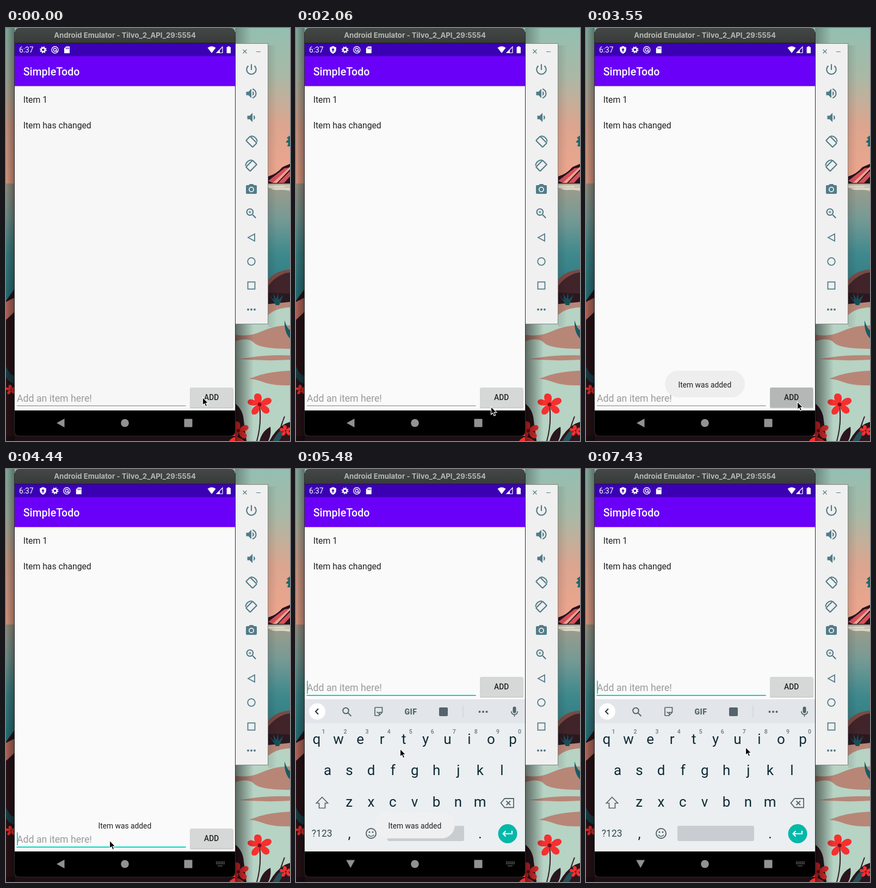
These frames come from a looping animation (522 by 757 pixels, 8000 ms). An HTML page:

```html
<!DOCTYPE html>
<html lang="en">
<head>
<meta charset="utf-8">
<title>Todo list demo</title>
<style>
  html, body { margin: 0; width: 100%; height: 100%; overflow: hidden; background: #2a1319; }
  svg { display: block; width: 522px; height: 757px; }
  text { font-family: Roboto, "Open Sans", sans-serif; fill: #212121; white-space: pre; }
  .mid { text-anchor: middle; }
  .line { fill: none; stroke: currentColor; }
  .side { color: #527c89; fill: #527c89; }
  .keys { color: #55646b; fill: #55646b; }
  .letter { font-size: 26px; fill: #0f2a34; text-anchor: middle; }
  .digit { font-size: 10.5px; font-weight: 500; fill: #68757b; text-anchor: middle; }
  #back { transform-box: fill-box; transform-origin: center; }
</style>
</head>
<body>
<svg viewBox="0 0 522 757">
  <defs>
    <linearGradient id="sky" x2="0" y2="1">
      <stop offset="0" stop-color="#93bfb1"/><stop offset=".3" stop-color="#a9b9a6"/>
      <stop offset=".62" stop-color="#dca58f"/><stop offset="1" stop-color="#f0a58c"/>
    </linearGradient>
    <linearGradient id="sea" x2="0" y2="1">
      <stop offset="0" stop-color="#a09c8b"/><stop offset=".3" stop-color="#769a95"/>
      <stop offset=".6" stop-color="#3f898d"/><stop offset="1" stop-color="#26777f"/>
    </linearGradient>
    <linearGradient id="shadeL"><stop offset="0" stop-opacity=".12"/><stop offset="1" stop-opacity=".42"/></linearGradient>
    <linearGradient id="shadeR"><stop offset="0" stop-opacity=".5"/><stop offset="1" stop-opacity="0"/></linearGradient>
    <linearGradient id="bar" x2="0" y2="1"><stop offset="0" stop-color="#434745"/><stop offset="1" stop-color="#383b3a"/></linearGradient>
    <clipPath id="content"><rect x="16" y="106" width="405" height="595"/></clipPath>
    <g id="flower" fill="#f6302f">
      <path d="M0 0C-11-4-13-19-5-20C5-21 7-10 0 0C6-12 19-16 22-8C23 0 10 4 0 0C13 0 22 9 17 15C10 21 1 11 0 0C2 12-5 21-13 18C-18 12-11 2 0 0C-11 4-23 2-22-6C-18-13-7-9 0 0Z"/>
      <circle r="3.5" fill="#7a0f1d"/>
    </g>
    <g id="gear" fill="none" stroke="#fff">
      <circle r="3.5" stroke-width="2.5"/><circle r="5.3" stroke-width="2" stroke-dasharray="2.1 2.06"/>
    </g>
    <g id="turn" class="line" stroke-width="2.2">
      <rect x="-5.4" y="-8.6" width="10.8" height="17.2" rx="1" transform="rotate(-45)"/>
      <path d="M-1-10.5A11 11 0 0 1 10.6 0" stroke-width="2"/>
    </g>
  </defs>

  <!-- wallpaper -->
  <rect width="522" height="286" fill="url(#sky)"/>
  <rect y="285" width="522" height="215" fill="url(#sea)"/>
  <path d="M522 197l-6 4 3 3-5 5 5 2-2 6h5Z" fill="#1c6a6d"/>
  <path d="M482 285V272Q497 268 508 255L522 249V285Z" fill="#24141f"/>
  <path d="M482 280L512 257 520 256 490 284ZM500 284L522 262V272L511 284Z" fill="#d6505a"/>
  <path d="M490 284L522 254V259L498 284Z" fill="#f0a08e"/>
  <path d="M482 287H522V299Q510 296 500 297T482 292Z" fill="#c9c6b5"/>
  <path d="M482 291h30M490 295h32" stroke="#efe7d6" stroke-width="1.5"/>
  <path d="M421 490H522V757H421Z" fill="#b88677"/>
  <path d="M482 461Q496 444 522 443V490H482Z" fill="#7a4a43"/>
  <path d="M482 472Q500 450 522 448V490H482Z" fill="#40242a"/>
  <path d="M482 485L522 487V502L482 506Z" fill="#2a1820"/>
  <path d="M496 508L485 491 493 499 491 486 497 497 500 485 501 498 510 489 502 508Z" fill="#174f58"/>
  <path d="M421 543H470Q482 514 522 512V545Q494 545 470 556T421 562Z" fill="#b6d3c4"/>
  <path d="M421 574Q446 566 456 577T522 588V600Q480 599 448 604T421 606Z" fill="#b6d3c4"/>
  <path d="M421 606Q470 611 522 608V628Q480 630 455 640T421 642Z" fill="#b6d3c4"/>
  <path d="M421 644Q450 640 470 648T522 655V757H421Z" fill="#b6d3c4"/>
  <path d="M522 569Q511 558 512 536Q516 550 522 554Z" fill="#165c63"/>
  <path d="M466 692Q470 725 461 757M427 735Q432 748 430 757M512 712Q503 735 498 757" fill="none" stroke="#351822" stroke-width="2"/>
  <path d="M421 757V688Q436 700 437 720Q440 742 442 757ZM466 757Q471 738 486 731Q488 745 482 757ZM484 757Q500 728 522 722V757Z" fill="#2b151e"/>
  <path d="M490 757Q501 738 509 734Q509 748 502 757Z" fill="#235157"/>
  <use href="#flower" x="466" y="690"/>
  <use href="#flower" transform="translate(427 738) scale(.85)"/>
  <use href="#flower" transform="translate(514 738) scale(.5)"/>
  <path d="M0 500L16 478V757H0Z" fill="#2a1319"/>
  <path d="M0 502L16 494V520L0 535Z" fill="#c06f62"/>
  <path d="M0 620Q9 640 16 636V652Q6 650 0 640Z" fill="#19434a"/>
  <use href="#flower" transform="translate(9 663) scale(.45)"/>
  <rect y="748" width="421" height="9" fill="#1e0f14"/>
  <path d="M410 757Q421 742 438 757Z" fill="#f6302f"/>
  <rect width="16" height="757" fill="url(#shadeL)"/>
  <rect x="421" y="543" width="34" height="214" fill="url(#shadeR)"/>
  <rect x="421" width="30" height="28" fill="url(#shadeR)" opacity=".55"/>
  <rect x="482" y="32" width="16" height="516" fill="url(#shadeR)" opacity=".2"/>

  <!-- tool strip -->
  <rect x="420.5" y="28.5" width="61" height="514" fill="#f0f0f0" stroke="#848484"/>
  <g class="side">
    <path class="line" d="M435.5 39.5l7 7m0-7l-7 7M460 43.5h8" stroke-width="1.2"/>
    <g id="tools"></g>
    <use href="#turn" transform="translate(451 208.5)"/>
    <use href="#turn" transform="translate(451 252.5) scale(-1 1)"/>
    <g class="line" stroke-width="1.8">
      <path d="M445 384L457 377.5V390.5Z"/><circle cx="451" cy="428" r="6.8"/>
      <rect x="444.5" y="465.5" width="13" height="13"/>
    </g>
    <circle cx="445" cy="516" r="2"/><circle cx="451" cy="516" r="2"/><circle cx="457" cy="516" r="2"/>
  </g>

  <!-- emulator window -->
  <path d="M15.5 8V738Q15.5 748 25.5 748H411.5Q421.5 748 421.5 738V8Z" fill="#000" stroke="#2c2c2c"/>
  <path d="M16 27.5V9Q16 0 25 0H412Q421 0 421 9V27.5Z" fill="url(#bar)"/>
  <text class="mid" x="218.5" y="18" style="font:700 13.2px Inter,sans-serif;fill:#b4b8b6">Android Emulator - Tilvo_2_API_29:5554</text>
  <rect id="page" x="16" y="106" width="405" height="595" fill="#f7f7f7"/>
  <rect x="16" y="28" width="405" height="24" fill="#3b00b4"/>
  <rect x="16" y="51.5" width="405" height="55" fill="#6a00f7"/>
  <text x="24" y="45" font-size="13.8" style="fill:#fff">6:37</text>
  <path id="shield" d="M68 33l5.8 2.4v4.2q0 5-5.8 7.6-5.8-2.6-5.8-7.6v-4.2Z" fill="#fff"/>
  <path id="shieldMark" d="M68 36.8l3 3.4h-2v3h-2v-3h-2Z" fill="#3b00b4"/>
  <g id="notes">
    <use href="#gear" x="68.3" y="40"/>
    <g fill="none" stroke="#fff" stroke-width="1.4">
      <circle cx="90" cy="40" r="6"/><circle cx="90" cy="40" r="2.7"/><path d="M91 41l4 3.5"/>
    </g>
    <path d="M110.5 33.7H117V46.3H107V37.2Z" fill="#fff"/>
    <path d="M110.5 35.8v3m2.2-3v3m2.2-3v3" stroke="#3b00b4" stroke-width="1.1"/>
  </g>
  <path d="M370.5 36.2Q378 31 385.5 36.2L378 46Z" fill="#fff"/>
  <path d="M398 34.5V45.5H387.2Z" fill="none" stroke="#fff" stroke-width="1.2"/>
  <path d="M393 40V45.5H387.2Z" fill="#fff"/>
  <path d="M407.5 33.5h3.6v1.5h1.9v11.3h-7.4V35h1.9Z" fill="#fff"/>
  <text x="31.7" y="87" font-size="19.6" font-weight="500" style="fill:#fff">SimpleTodo</text>
  <text x="31.7" y="136.5" font-size="15.76">Item 1</text>
  <text x="31.7" y="183.8" font-size="15.76">Item has changed</text>

  <g clip-path="url(#content)">
    <g id="form">
      <text x="20" y="685" font-size="17.7" style="fill:#9a9a9a">Add an item here!</text>
      <rect x="20" y="692" width="310.5" height="1" fill="#7c7c7c"/>
      <rect id="focus" x="19.5" y="692" width="311" height="2" fill="#05d6c3"/>
      <rect id="caret" x="20" y="666" width="1.8" height="24" fill="#05d6c3"/>
      <rect x="338" y="660.5" width="80" height="36.5" rx="2" fill="#000" opacity=".2"/>
      <rect id="button" x="338.3" y="659" width="79" height="36.5" rx="2" fill="#d6d8d7"/>
      <text class="mid" x="377.6" y="682.4" font-size="13.8" font-weight="500">ADD</text>
    </g>
    <g id="board" class="keys">
      <rect x="16" y="422" width="405" height="279" fill="#ebeff1"/>
      <rect x="16" y="422" width="405" height="44" fill="#e2e6ea"/>
      <circle cx="39" cy="444.5" r="15" fill="#fff"/>
      <g class="line" stroke-width="2">
        <path d="M41 439.5l-5 5 5 5" stroke="#263238"/>
        <circle cx="91.5" cy="443" r="5.3"/><path d="M95.5 447l6 6"/>
        <path d="M146 437h12.5v9l-6 6H146q-1 0-1-1v-13q0-1 1-1ZM159 446h-6v6M148.5 445q2.5 4 6 1" stroke-width="1.7"/>
        <path d="M307 434v22" stroke="#c9ced2" stroke-width="1"/>
        <path d="M395.8 444q0 6 5.7 6t5.7-6M401.5 450v4" stroke-width="1.7"/>
        <path d="M48 601.5l10.5 11H53.5V621.5H42.5V612.5H37.5Z" stroke-width="1.7"/>
        <path d="M383.5 604H400V620.5H383.5L376.5 612.2ZM386.5 608.5l7.5 7.5m0-7.5l-7.5 7.5" stroke-width="1.8"/>
        <circle cx="138" cy="668" r="9"/><path d="M133 670.5q5 6 10 0" stroke-width="1.7"/>
      </g>
      <circle cx="135" cy="665.5" r="1.5"/><circle cx="141" cy="665.5" r="1.5"/>
      <text class="mid" x="211" y="449.5" font-size="14" font-weight="900" letter-spacing=".6" style="fill:#55646b">GIF</text>
      <rect x="263" y="437" width="16" height="16" rx="2"/>
      <circle cx="337.5" cy="445" r="2"/><circle cx="344" cy="445" r="2"/><circle cx="350.5" cy="445" r="2"/>
      <rect x="398.5" y="435.5" width="6" height="12" rx="3"/>
      <g id="letters"></g>
      <text class="mid" x="47.7" y="674" font-size="17.5" style="fill:#35484f">?123</text>
      <rect x="168" y="654" width="141" height="28" rx="3" fill="#c9cdd1"/>
      <circle cx="389" cy="668.5" r="17.5" fill="#03b8a8"/>
      <path d="M397 663v5.5H381m4.5-5l-5 5 5 5" fill="none" stroke="#fff" stroke-width="2"/>
    </g>
    <g id="toast">
      <rect id="pill" x="145" y="628" width="147" height="49" rx="24.5" fill="#eee"/>
      <text x="169.5" y="658.8" font-size="13.8">Item was added</text>
    </g>
  </g>

  <!-- navigation bar -->
  <g fill="#929292">
    <path id="back" d="M93 724L107.5 716V732Z"/>
    <circle cx="218.5" cy="724" r="7.3"/>
    <rect x="327.5" y="716.5" width="15" height="15" rx="1"/>
    <path id="keyIcon" d="M386 720.5h16M386 723.5h16M389.5 727.5h9" stroke="#8a8a8a" stroke-width="1.6" stroke-dasharray="1.8 1"/>
  </g>

  <path id="cursor" d="M.5 0V14.5L3.8 11.5 6 16.7 8.6 15.6 6.4 10.6H10.9Z" fill="#000" stroke="#fff" stroke-width="1.1"/>
</svg>

<script>
const LOOP = 8000;
const $ = id => document.getElementById(id);
const NS = 'http://www.w3.org/2000/svg';

function add(parent, tag, attrs, text = '') {
  const el = document.createElementNS(NS, tag);
  for (const k in attrs) el.setAttribute(k, attrs[k]);
  el.textContent = text;
  parent.append(el);
}

// Side icons on a 24-unit grid: centre y, scale, outline
[
  [76, 1.08, 'M13 3h-2v10h2V3zm4.83 2.17l-1.42 1.42C17.99 7.86 19 9.81 19 12c0 3.87-3.13 7-7 7s-7-3.13-7-7c0-2.19 1.01-4.14 2.58-5.42L6.17 5.17C4.23 6.82 3 9.26 3 12c0 4.97 4.03 9 9 9s9-4.03 9-9c0-2.74-1.23-5.18-3.17-6.83z'],
  [120, 1.06, 'M3 9v6h4l5 5V4L7 9H3zm13.5 3c0-1.77-1.02-3.29-2.5-4.03v8.05c1.48-.73 2.5-2.25 2.5-4.02zM14 3.23v2.06c2.89.86 5 3.54 5 6.71s-2.11 5.85-5 6.71v2.06c4.01-.91 7-4.49 7-8.77s-2.99-7.86-7-8.77z'],
  [164, 1.06, 'M18.5 12c0-1.77-1.02-3.29-2.5-4.03v8.05c1.48-.73 2.5-2.25 2.5-4.02zM5 9v6h4l5 5V4L9 9H5z'],
  [296, 1, 'M9 2L7.17 4H4c-1.1 0-2 .9-2 2v12c0 1.1.9 2 2 2h16c1.1 0 2-.9 2-2V6c0-1.1-.9-2-2-2h-3.17L15 2H9zm3 15a5 5 0 1 1 0-10a5 5 0 1 1 0 10zM12 15.2a3.2 3.2 0 1 1 0-6.4a3.2 3.2 0 1 1 0 6.4z'],
  [340, 1.06, 'M15.5 14h-.79l-.28-.27A6.47 6.47 0 0 0 16 9.5 6.5 6.5 0 1 0 9.5 16c1.61 0 3.09-.59 4.23-1.57l.27.28v.79l5 4.99L20.49 19l-4.99-5zm-6 0a4.5 4.5 0 1 1 0-9a4.5 4.5 0 1 1 0 9zM12 10h-2v2H9v-2H7V9h2V7h1v2h2v1z']
].forEach(([y, s, d]) => add($('tools'), 'path', {
  d, 'fill-rule': 'evenodd', transform: `translate(451 ${y}) scale(${s}) translate(-12 -12)`
}));

// Keyboard rows: letters, first centre x, baseline
[['qwertyuiop', 38, 504], ['asdfghjkl', 58, 561], ['zxcvbnm', 97.8, 619]].forEach(([row, x0, y], r) => {
  [...row].forEach((ch, i) => {
    const x = x0 + i * 40.05;
    add($('letters'), 'text', { class: 'letter', x, y }, ch);
    if (!r) add($('letters'), 'text', { class: 'digit', x: x + 12.5, y: 484.5 }, (i + 1) % 10);
  });
});
add($('letters'), 'text', { class: 'letter', x: 98, y: 677 }, ',');
add($('letters'), 'text', { class: 'letter', x: 338.5, y: 677 }, '.');

// Holds each value until the next time in the table
function hold(id, prop, rows) {
  const frames = rows.map(([t, v]) => ({ offset: t / LOOP, [prop]: v, easing: 'step-end' }));
  frames.push({ offset: 1, [prop]: rows.at(-1)[1] });
  $(id).animate(frames, { duration: LOOP, iterations: Infinity });
}
const move = (id, rows) =>
  hold(id, 'transform', rows.map(([t, x, y]) => [t, `translate(${x}px, ${y}px)`]));
// Toggles visibility, starting hidden
const blink = (id, ...times) =>
  hold(id, 'opacity', [0, ...times].map((t, i) => [t, i % 2]));

move('cursor', [
  [0, 361, 677], [740, 361, 680], [890, 361, 690], [1040, 360, 701], [1190, 359, 706],
  [1330, 358, 705], [1480, 358, 702], [1620, 358, 698], [1770, 358, 695], [1920, 358, 694],
  [2210, 361, 692], [2510, 374, 688], [2660, 386, 685], [2810, 388, 685],
  [3850, 372, 684], [4000, 300, 681], [4140, 218, 680], [4290, 190, 681],
  [5190, 190, 660], [5340, 191, 570], [5480, 191, 513], [5930, 194, 513],
  [6080, 208, 514], [6230, 237, 515], [6380, 305, 515], [6530, 312, 514],
  [6680, 304, 512], [6830, 296, 511], [6980, 293, 510]
]);
hold('page', 'fill', [[0, '#f7f7f7'], [300, '#fafafa']]);
blink('shield', 1190);
blink('shieldMark', 1190);
move('notes', [[0, 0, 0], [1190, 21.7, 0]]);
hold('button', 'fill', [
  [0, '#d6d8d7'], [2660, '#b4b7b6'], [2960, '#d6d8d7'], [3550, '#b4b7b6'], [3850, '#d6d8d7']
]);
hold('toast', 'opacity', [[0, 0], [2810, .5], [2960, 1], [6830, .5], [6980, 0]]);
hold('pill', 'fill', [[0, '#eeeeee'], [4290, '#fafafa'], [4740, '#eef0f1']]);
blink('focus', 4290);
blink('caret', 4290, 4890, 5480, 5930, 6530, 6980, 7430);
blink('keyIcon', 4440);
move('form', [[0, 0, 0], [4590, 0, -278]]);
move('board', [[0, 0, 290], [4590, 0, 190], [4740, 0, 35], [4890, 0, 0]]);
hold('back', 'transform', [[0, 'rotate(0deg)'], [4890, 'rotate(-90deg)']]);
</script>
</body>
</html>
```
